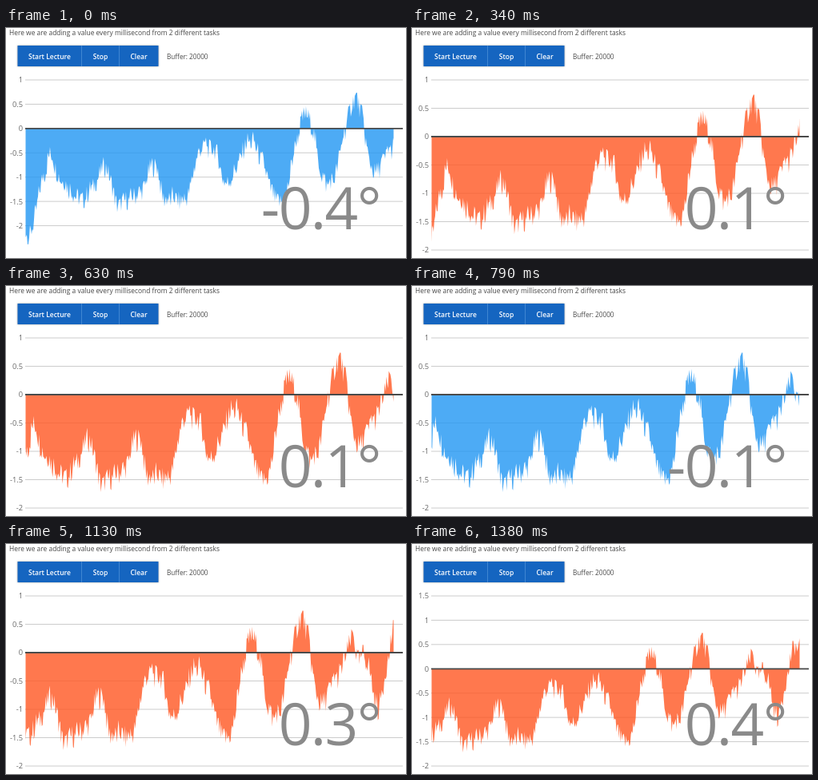
These frames come from a looping animation (500x288 px, 1.4 s). An HTML page:

```html
<!DOCTYPE html>
<html lang="en">
<head>
<meta charset="utf-8">
<title>Live chart</title>
<style>
  html, body { margin: 0; width: 100%; height: 100%; overflow: hidden; background: #fff; }
  svg { display: block; width: 500px; height: 288px; font-family: "Open Sans", "Noto Sans", sans-serif; }
  .note { fill: #484848; font-size: 8.43px; }
  .bar { fill: #1565c0; filter: drop-shadow(.5px .5px 1px rgba(0, 0, 0, .4)); }
  .split { stroke: #3f86d2; }
  .button { fill: #fff; font-size: 8.5px; font-weight: 600; text-anchor: middle; }
  #ticks text { fill: #666; font-size: 9.3px; text-anchor: end; }
  #ticks path { stroke: #ccc; }
  #area { fill-opacity: .8; }
  #zero { stroke: #4a4a4a; stroke-width: 1.8; }
  #value { fill: #8a8a8a; font-size: 73px; letter-spacing: -1.7px; text-anchor: end; }
</style>
</head>
<body>
<svg viewBox="0 0 500 288">
  <clipPath id="plot"><rect x="24.5" y="56" width="460" height="232"/></clipPath>
  <text class="note" x="4" y="9">Here we are adding a value every millisecond from 2 different tasks</text>
  <rect class="bar" x="14.5" y="22" width="176" height="26"/>
  <path class="split" d="M94.5 22v26M141.5 22v26"/>
  <text class="button" x="54.5" y="38.5">Start Lecture</text>
  <text class="button" x="118" y="38.5">Stop</text>
  <text class="button" x="166" y="38.5">Clear</text>
  <text class="note" x="201" y="38.5" style="font-size:8.2px">Buffer: 20000</text>
  <g id="ticks"></g>
  <g clip-path="url(#plot)"><path id="area"/></g>
  <path id="zero" d="M24 0H496"/>
  <text id="value" x="468" y="252"></text>
</svg>
<script>
const LOOP = 1400, TOP = 65, HEIGHT = 213, EDGE = 484;
const SPEED = .0325, JUMP_AT = 1110, JUMP = 30.5;
const $ = id => document.getElementById(id);

// Turning points of the signal: position, value
const turns = [
  [20, -1.8], [26, -2.2], [57, -.6], [67, -1.05], [92, -1.45], [125, -.85], [142, -1.6],
  [163, -1.4], [187, -.75], [198, -1.4], [222, -1.5], [245, -.35], [259, -.35], [275, -1.1],
  [305, -.25], [344, -1.5], [374, .25], [403, -1.15], [438, .58], [461, -.9], [484, -.4],
  [500, .3], [508, -.1], [518, -.1], [530, -.95], [556, .44], [570, .44]
];

// Cosine ease from one turning point to the next
function trend(x) {
  const i = turns.findIndex(point => point[0] > x);
  const [x0, y0] = turns[i - 1], [x1, y1] = turns[i];
  return y0 + (y1 - y0) * (1 - Math.cos(Math.PI * (x - x0) / (x1 - x0))) / 2;
}

function noise(i) {
  const n = Math.sin(i * 12.9898) * 43758.5453;
  return n - Math.floor(n) - .5;
}

function drawSignal() {
  let d = "M20 0";
  for (let x = 20; x <= 566; x++) {
    const jitter = .42 * noise(x) + .16 * noise(Math.floor(x / 4));
    d += `L${x} ${(trend(x) + jitter).toFixed(3)}`;
  }
  $("area").setAttribute("d", d + "V0Z");
}

function drawAxis(low, high) {
  const unit = HEIGHT / (high - low), zero = TOP + high * unit;
  let marks = "";
  for (let v = high; v >= -2; v -= .5) {
    const y = zero - v * unit;
    marks += `<path d="M24 ${y}H496"/><text x="21" y="${y + 3.4}">${v}</text>`;
  }
  $("ticks").innerHTML = marks;
  $("zero").setAttribute("transform", `translate(0 ${zero})`);
  return { unit, zero };
}

function frame() {
  const t = performance.now() % LOOP;
  const shift = t * SPEED + (t < JUMP_AT ? 0 : JUMP);
  const { unit, zero } = drawAxis(t < 290 ? -2.5 : -2, t < 1340 ? 1 : 1.5);
  const value = trend(EDGE + shift);
  $("area").setAttribute("transform", `translate(${-shift} ${zero}) scale(1 ${-unit})`);
  $("area").setAttribute("fill", value < 0 ? "#2196f3" : "#ff5722");
  $("value").textContent = value.toFixed(1) + "°";
  requestAnimationFrame(frame);
}

drawSignal();
frame();
</script>
</body>
</html>
```
